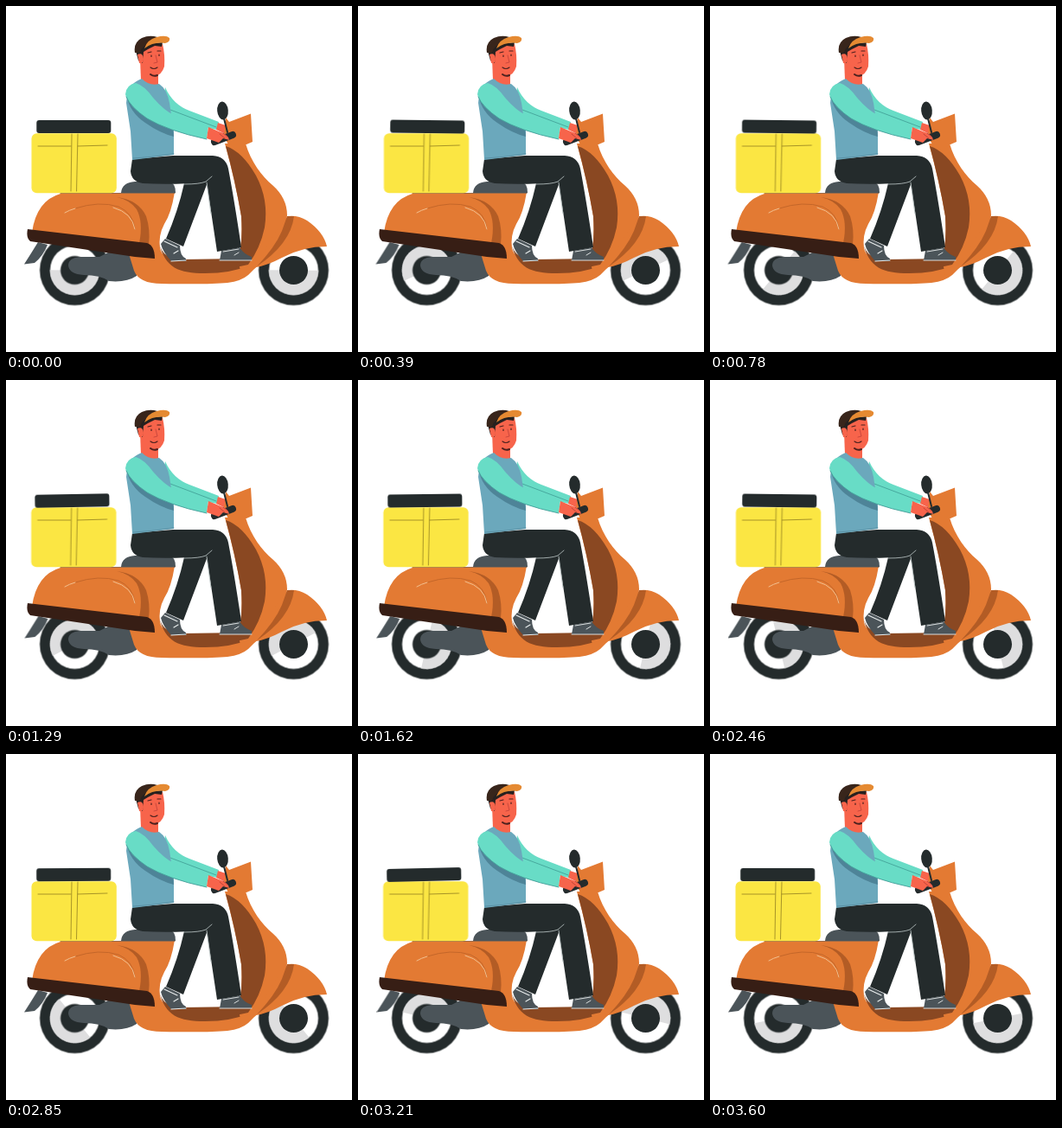
These frames come from a looping animation (400 by 400 pixels, 3.63 s). An HTML page:

```html
<!DOCTYPE html>
<html lang="en">
<head>
<meta charset="utf-8">
<title>Delivery scooter</title>
<style>
  html, body { margin: 0; width: 100%; height: 100%; overflow: hidden; background: #fff; }
  svg { display: block; width: 100vw; height: 100vh; }
  .shade { fill: #dededf; animation: spin 907.5ms linear infinite; }
  .lid, .box, .flap { animation: sway 1815ms infinite; }
  .lid { --x: 2px; --r: .8deg; transform-origin: 78px 140px; }
  .box { --x: .4px; --r: 0deg; }
  .flap { --x: -.5px; --r: 0deg; }
  @keyframes spin { to { transform: rotate(360deg); } }
  @keyframes sway {
    0% { transform: translate(0) rotate(0deg); animation-timing-function: cubic-bezier(.1, .6, .4, 1); }
    25%, 36% { transform: translate(var(--x)) rotate(var(--r)); animation-timing-function: ease-in-out; }
    77% { transform: translate(calc(var(--x) * -1)) rotate(calc(var(--r) * -1.5)); animation-timing-function: linear; }
    100% { transform: translate(0) rotate(0deg); }
  }
  .orange { fill: #e37a33; }
  .rust { fill: #b35c25; }
  .brown { fill: #8a4822; }
  .dark { fill: #242b2c; }
  .grey { fill: #4b5459; }
  .skin { fill: #f7644b; }
  .teal { fill: #68dcc6; }
  .blue { fill: #6ba8bc; }
  .white { fill: #fff; }
  .line { fill: none; stroke-linecap: round; stroke-linejoin: round; }
</style>
</head>
<body>
<svg viewBox="0 0 400 400">
  <path class="flap grey" d="M37 273L48 276Q43 289 33 297L21 298.500Q29 286 37 273Z"/>
  <g transform="translate(79.500 305.500)">
    <circle class="dark" r="40.500"/>
    <circle class="white" r="28.500"/>
    <path class="shade" d="M-28.500 0A28.500 28.500 0 0 0 28.500 0Z"/>
    <circle class="dark" r="16.500"/>
  </g>
  <g transform="translate(332.500 305.500)">
    <circle class="dark" r="40.500"/>
    <circle class="white" r="28.500"/>
    <path class="shade" d="M-28.500 0A28.500 28.500 0 0 0 28.500 0Z"/>
    <circle class="dark" r="16.500"/>
  </g>
  <path class="grey" d="M72 300Q72 291 86 290L108 290L120 284L152 288L151 312Q139 320 119 318Q109 311 90 311Q73 310 72 300Z"/>

  <!-- scooter body -->
  <path class="orange" d="M63 217L195 215Q191 240 183 252Q176 265 178 280Q181 294 205 294L262 293L310 282L289 302L280 311Q272 318 256 320Q235 322 180 321Q154 321 148 306L140 280L30 262Q35 225 63 217Z"/>
  <path class="brown" d="M177 274Q181 293 204 293L272 292L292 283L286 299Q260 309 230 309C200 309 184 303 177 274Z"/>
  <path class="orange" d="M253 159L277 159C283 180 296 197 308 207Q325 222 325 242Q323 266 302 290L288 303L272 311L268 292Q274 275 272 243Q265 202 253 159Z"/>
  <path class="brown" d="M254 162Q273 168 289 196Q304 224 299 256Q294 280 280 299L266 302L268 292Q274 275 272 243Q265 202 254 162Z"/>
  <path class="orange" d="M289 302Q310 258 327 243Q338 242 348 248Q367 261 371 278Q343 278 319 291Q302 300 289 302Z"/>
  <path class="rust" d="M325 243L333 243Q329 275 290 301Q311 279 319 260Z"/>
  <path class="rust" d="M128 221Q153 224 162 243Q167 258 165 276L154 274Q159 250 151 235Q143 224 128 221Z"/>
  <path class="line" d="M80 234Q108 225 130 232Q147 239 149 258" stroke="#c46629"/>
  <path class="line" d="M124 233Q146 239 149 258M68 239Q73 236 80 234" stroke="#f3c08f"/>
  <path d="M25 258L163 274Q172 277 172 292L149 290L28 272Q23 268 25 258Z" fill="#371e15"/>
  <path class="line" d="M63 216.500H195" stroke="#9b6a48"/>
  <path class="grey" d="M133 216Q134 204 149 203L188 203Q196 204 196 216Z"/>

  <!-- cargo -->
  <g class="box">
    <rect x="29.500" y="147.300" width="98.300" height="69" rx="6" fill="#fbe643"/>
    <path class="line" d="M37 162H75M83 162L117 161M76 148L75 214M83 148L81.500 214" stroke="#927f20" stroke-width=".8"/>
  </g>
  <rect class="lid dark" x="35.300" y="132" width="86" height="15" rx="3"/>

  <!-- legs -->
  <path class="grey" d="M184 269L201 277Q201 289 208 292V295H191Q181 284 179 275Z"/>
  <path class="line" d="M191 295L208 294M183 272L198 279M194 286L199 283" stroke="#e8ecec" stroke-width="1.200"/>
  <path class="dark" d="M204 202L236 196L205 278L185 269Q199 237 206 205Z"/>
  <path class="grey" d="M249 283L270 279Q275 287 284 290V294H247Z"/>
  <path class="line" d="M247 294H284M251 284L269 281M264 288L269 285" stroke="#d9dddd"/>
  <path class="dark" d="M146 177L193 173H239Q254 174 257 188Q264 225 272 279L244 284L232 204Q190 207 158 205Q145 203 144 191Z"/>
  <path class="line" d="M206 206Q224 206 231 203L238 197M232 204L237 240" stroke="#aeb8b8" stroke-width=".9"/>

  <!-- far arm, steering -->
  <path class="teal" d="M184 94Q193 114 212 121L246 134L244 143L205 135L181 120Z"/>
  <path class="line" d="M190 120L243 140" stroke="#3f9c93" stroke-width=".8"/>
  <path class="skin" d="M245 135L254 138Q260 144 256 149L243 143Z"/>
  <path class="orange" d="M254 129L258 134L283 124.500L285 157L278 160L257 160L252 151Z"/>
  <path class="line" d="M252 130L256 146" stroke="#242b2c" stroke-width="2"/>
  <ellipse class="dark" cx="250.500" cy="121" rx="6.300" ry="10.500" transform="rotate(-5 250.500 121)"/>
  <path class="line" d="M241 157L262 149" stroke="#242b2c" stroke-width="8"/>

  <!-- torso, near arm -->
  <path class="skin" d="M155 60L156 86Q165 96 176 93L176 75Z"/>
  <path class="blue" d="M141 95Q149 87 157 84Q166 93 177 90Q186 96 189 112L194 146V172L146 178L144 145L139 112Z"/>
  <path d="M139 103Q143 123 161 135Q178 147 194 151L193 139L160 122Z" fill="#4e8498"/>
  <path class="line" d="M147 176Q170 175 194 171" stroke="#568b9f" stroke-width=".8"/>
  <path class="teal" d="M150 89Q139 91 138 102Q141 115 163 130Q186 144 232 154L234 139L194 126Q183 121 170 106Q160 92 150 89Z"/>
  <path class="line" d="M139 105Q144 117 163 130Q186 144 232 154" stroke="#459e99" stroke-width=".9"/>
  <path class="skin" d="M234 140L246 145Q257 148 258 155L251 153L246 158L232 153Z"/>
  <path class="line" d="M247 148L253 153M251 147L256 151" stroke="#b94338" stroke-width=".9"/>

  <!-- head -->
  <path class="skin" d="M155 49L181 44Q184 56 183 70Q180 80 172 81Q162 79 156 68Z"/>
  <path d="M150 52L160 44L181 42L180 47L172 46L164 50L159 53L158 66L153 63Z" fill="#27211f"/>
  <path class="skin" d="M152 56Q158 53 159 61Q159 67 154 66Z"/>
  <path d="M149 54Q147 42 157 37Q166 33 175 36L166 44Q157 45 155 54Z" fill="#38251b"/>
  <path d="M160 49Q163 39 174 36Q185 33 189 37Q190 42 184 43Q171 41 160 49Z" fill="#e58a32"/>
  <g class="line" stroke="#4b211f" stroke-width="1.200">
    <path d="M164 54L168 53M175 52L179 52M168 57V58.500M177 56V57.500M167 71Q171 74 175 71"/>
    <path d="M173 57L175 65L171 66" stroke="#c7463b" stroke-width=".9"/>
    <path d="M167 79Q171 82 175 80" stroke-width="2"/>
  </g>
</svg>
</body>
</html>
```
